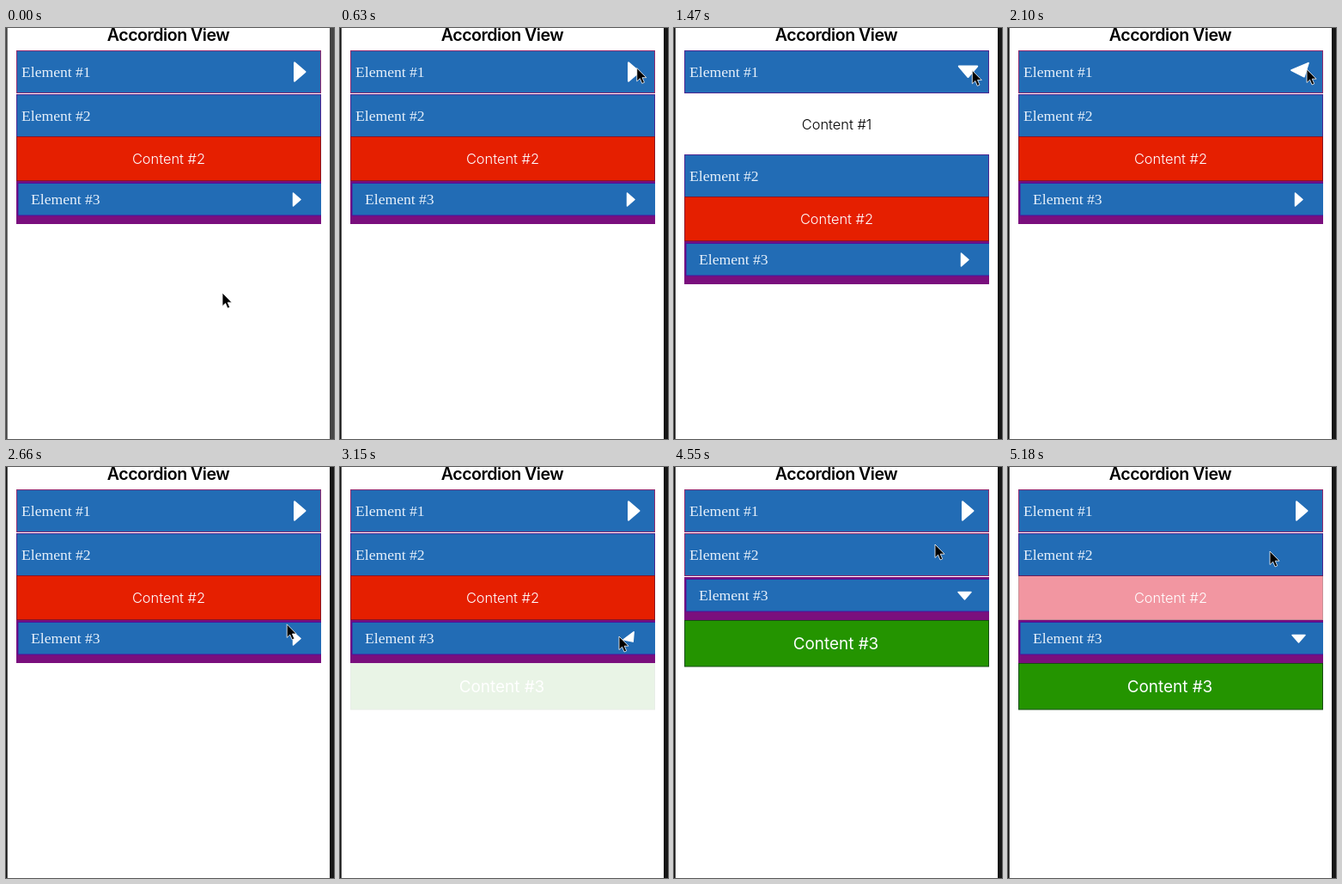
An HTML page for the animation above (5250 ms loop, 382x478 px).

```html
<!DOCTYPE html>
<html lang="en">
<head>
<meta charset="utf-8">
<title>Accordion View</title>
<style>
html, body { margin: 0; width: 100%; height: 100%; overflow: hidden; background: #fff; }
svg { display: block; }
text { font-family: Inter, "Liberation Sans", sans-serif; fill: #fff; }
.title { font-size: 19.6px; font-weight: 600; letter-spacing: -.5px; text-anchor: middle; fill: #000; }
.label { font: 17.6px "Liberation Serif", serif; fill: #e6f0fa; }
.body { font-size: 16.4px; font-weight: 300; text-anchor: middle; }
.row { fill: #226cb5; }
.arrow { fill: #fff; stroke: #fff; stroke-linejoin: round; }
</style>
</head>
<body>
<svg width="382" height="478" viewBox="0 0 382 478">
  <g id="edges"><rect width="1.7" height="478"/><rect x="377" width="5" height="478"/></g>
  <text class="title" x="189" y="15">Accordion View</text>

  <rect id="row1" class="row" x="12.5" y="26.5" width="354" height="49"/>
  <text id="label1" class="label" x="18" y="57">Element #1</text>
  <path id="arrow1" class="arrow" stroke-width="2" d="M-6.5-10.7V10.7L6 0z"/>
  <text id="body1" class="body" x="189.5" y="118" style="fill:#000">Content #1</text>

  <g id="part2">
    <rect id="row2" class="row" x="12.5" y="77.5" width="354" height="49"/>
    <text class="label" x="18" y="108">Element #2</text>
    <g id="body2">
      <rect id="panel2" x="12.5" y="126.5" width="354" height="51" stroke="#8c1420"/>
      <text class="body" x="189.5" y="158">Content #2</text>
    </g>
  </g>

  <g id="part3">
    <rect x="12" y="178" width="355" height="50" fill="#7a0f7d"/>
    <rect x="14" y="181" width="353" height="37" fill="#226cb5"/>
    <path d="M367 180.5H14V218H367" fill="none" stroke="#4b129c"/>
    <text class="label" x="29" y="205">Element #3</text>
    <path id="arrow3" class="arrow" stroke-width="1.5" d="M-4-7.5V7.5L4.5 0z"/>
    <g id="body3">
      <rect x="12.5" y="228.5" width="354" height="53.5" fill="#249400" stroke="#174d12"/>
      <text class="body" x="188.5" y="262" style="font-size:18.9px;font-weight:400">Content #3</text>
    </g>
  </g>

  <path id="cursor" d="M0 0V15.5L3.6 12.2 6 18 8.7 16.8 6.2 11.2H11z" fill="#000" stroke="#fff" stroke-width=".8"/>
</svg>
<script>
const $ = id => document.getElementById(id);
const LOOP = 5250, TURN = 350, FADE_DELAY = 130;
const OPEN1 = 745, CLOSE1 = 1985, OPEN3 = 2954, CLOSE2 = 4095, OPEN2 = 4885;
const PINK = '#8f2a70', VIOLET = '#4c2590';

// time, x, y of the pointer tip
const path = [
  [0, 252, 308], [70, 254, 303], [480, 367, 32], [650, 345, 47], [900, 345, 47],
  [1300, 347, 50], [1750, 348, 48], [2240, 348, 48], [2760, 325, 197], [3430, 325, 197],
  [3710, 319, 129], [3990, 304, 91], [4550, 304, 90], [4760, 305, 98], [LOOP, 305, 98]
];

const clamp = v => Math.max(0, Math.min(1, v));
const smooth = v => { v = clamp(v); return v * v * (3 - 2 * v); };
const turn = (t, start) => smooth((t - start) / TURN);
const fade = (t, start) => turn(t, start + FADE_DELAY);
const set = (id, name, value) => $(id).setAttribute(name, value);
const move = (id, x, y, angle = 0) =>
  set(id, 'transform', `translate(${x} ${y}) rotate(${angle})`);

function pointer(t) {
  const i = path.findIndex(p => p[0] > t);
  const [a, b] = [path[i - 1], path[i]];
  const k = smooth((t - a[0]) / (b[0] - a[0]));
  return [a[1] + (b[1] - a[1]) * k, a[2] + (b[2] - a[2]) * k];
}

function draw(t) {
  const open1 = t >= OPEN1 && t < CLOSE1;
  const open2 = t < CLOSE2 || t >= OPEN2;
  const shown2 = t < CLOSE2 ? 1 : fade(t, OPEN2);
  const shift = open1 ? 70 : 0;

  set('edges', 'fill', t < 630 ? '#454545' : '#161616');
  set('row1', 'stroke', open1 ? VIOLET : PINK);
  set('row2', 'stroke', open2 ? VIOLET : PINK);
  $('label1').style.fill = t >= 665 && t < 900 ? '#1414d2' : '';

  move('arrow1', 342.5, 51, 90 * (turn(t, OPEN1) - turn(t, CLOSE1)));
  move('arrow3', 338.5, 199.5, 90 * turn(t, OPEN3));
  move('part2', 0, shift);
  move('part3', 0, shift - (open2 ? 0 : 50));

  set('body1', 'opacity', open1 ? fade(t, OPEN1) : 0);
  set('body2', 'opacity', shown2);
  set('body3', 'opacity', fade(t, OPEN3));
  // the red panel starts out pinkish while it fades in
  set('panel2', 'fill', `rgb(229 31 ${100 * (1 - shown2)})`);
  move('cursor', ...pointer(t));
}

const begin = performance.now();
function frame() {
  draw((performance.now() - begin) % LOOP);
  requestAnimationFrame(frame);
}
frame();
</script>
</body>
</html>
```
